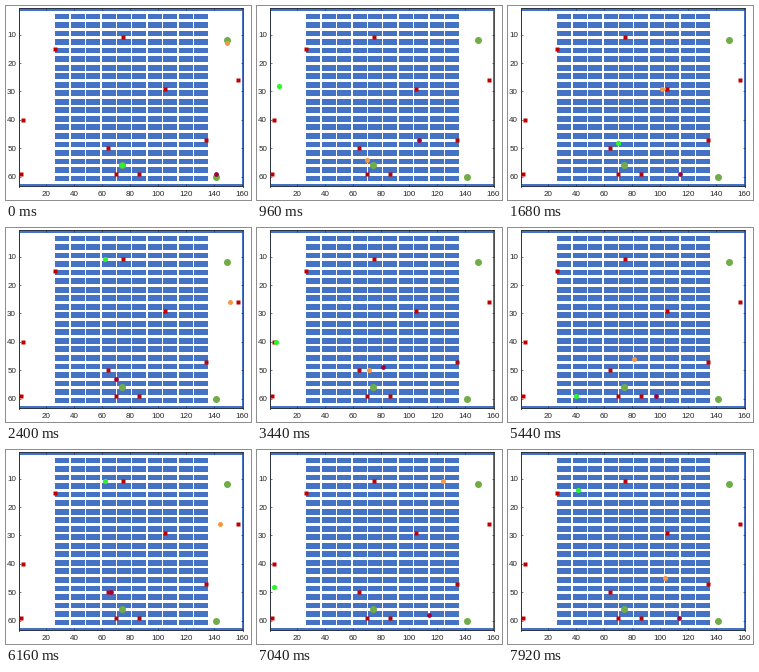
A matplotlib script for the animation above (8000 ms loop, 245 px wide and 194 px high).

```python
import numpy as np
import matplotlib.pyplot as plt
from matplotlib.animation import FuncAnimation
from matplotlib.colors import ListedColormap

W, H, DPI = 245, 194, 100
FRAMES, INTERVAL = 100, 80
COLS, ROWS = 160, 63
PX = 72 / DPI  # points per pixel

plt.rcParams["font.family"] = "Liberation Sans"

# Warehouse grid: outer wall and ten by twenty shelf blocks.
FIRST, LAST, CENTRE = 26, 136, 81
AISLES = range(FIRST, LAST + 1, 11)
grid = np.ones((ROWS, COLS))
grid[1:-1, 1:-1] = 0
for top in range(2, 60, 3):
    for left in AISLES[:-1]:
        grid[top:top + 2, left:left + 10] = 1

DEPOTS = EAST_DEPOT, HUB, SOUTH_DEPOT = (149, 12), (74, 56), (141, 60)
GOODS = (NORTHWEST, NORTH, UPPER, EAST, WEST, SOUTHWEST, MIDDLE, SOUTH,
         LOWER, CORNER) = ((26, 15), (75, 11), (105, 29), (157, 26), (3, 40),
                           (2, 59), (64, 50), (70, 59), (86, 59), (134, 47))

# Each tour passes one way point at each of these times,
# with the errands of each list in between.
KEY_FRAMES = [0, 12, 30, 43, 59, 77, 99]
GREEN = [
    HUB, [NORTHWEST], (7, 28), [WEST, SOUTHWEST, HUB, NORTHWEST],
    (62, 11), [NORTH, HUB, SOUTHWEST], (5, 40), [NORTHWEST, NORTH, HUB],
    (29, 14), [NORTHWEST, WEST, SOUTHWEST, HUB],
    (62, 11), [NORTH, HUB, WEST, SOUTHWEST, HUB], (41, 14)]
ORANGE = [
    (149, 13), [EAST], (70, 54), [HUB, MIDDLE, UPPER, EAST_DEPOT],
    (151, 26), [EAST], (71, 50), [HUB, EAST],
    (131, 47), [HUB], (144, 26), [EAST, EAST_DEPOT], (103, 45)]
CRIMSON = [
    (141, 59), [UPPER, CORNER],
    (107, 47), [MIDDLE, SOUTH, LOWER, SOUTH_DEPOT],
    (70, 53), [MIDDLE, SOUTH_DEPOT],
    (81, 49), [MIDDLE, LOWER, SOUTH_DEPOT, UPPER],
    (125, 41), [CORNER, MIDDLE, LOWER, SOUTH_DEPOT],
    (66, 50), [MIDDLE, LOWER, SOUTH_DEPOT, UPPER, CORNER], (113, 59)]


def lane(y):
    """Nearest free row between the shelves."""
    return 3 * round((y - 2) / 3) + 2


def route(a, b):
    """Corners after a on the way to b: straight outside, else by aisles."""
    (ax_, ay), (bx, by) = a, b
    if max(ax_, bx) <= FIRST or min(ax_, bx) >= LAST:
        return [b]
    aisle = bx
    if lane(ay) != lane(by):
        aisle = min(AISLES, key=lambda c: (abs(ax_ - c) + abs(bx - c),
                                           abs(c - CENTRE)))
    return [(ax_, lane(ay)), (aisle, lane(ay)), (aisle, lane(by)),
            (bx, lane(by)), b]


def trace(tour):
    """Position per frame, at constant speed between way points."""
    points, errands = tour[::2], tour[1::2]
    track = [points[0]]
    for i, stops in enumerate(errands):
        path = [points[i]]
        for stop in [*stops, points[i + 1]]:
            path += route(path[-1], stop)
        pts = np.array(path, float)
        dist = np.r_[0, np.cumsum(np.hypot(*np.diff(pts, axis=0).T))]
        steps = KEY_FRAMES[i + 1] - KEY_FRAMES[i]
        at = np.linspace(0, dist[-1], steps + 1)[1:]
        track += zip(np.interp(at, dist, pts[:, 0]),
                     np.interp(at, dist, pts[:, 1]))
    return np.round(track)


fig = plt.figure(figsize=(W / DPI, H / DPI), dpi=DPI, facecolor="white")
LEFT, TOP, WIDE, TALL = 13, 1.65, 224, 178.9
ax = fig.add_axes([LEFT / W, 1 - (TOP + TALL) / H, WIDE / W, TALL / H])
ax.imshow(grid, cmap=ListedColormap(["white", "#4472c4"]), aspect="auto",
          interpolation="nearest", extent=(0.5, COLS + 0.5, ROWS + 0.5, 0.5))
ax.spines["bottom"].set_position(("outward", -PX))
ax.set_xticks(range(20, 161, 20))
ax.set_yticks(range(10, 61, 10))
ax.tick_params(direction="in", length=2 * PX, width=0.6 * PX, pad=3 * PX,
               labelsize=8 * PX, color="#262626", labelcolor="#262626",
               top=True, right=True)
ax.tick_params(axis="x", pad=5 * PX)
for spine in ax.spines.values():
    spine.set(linewidth=0.8 * PX, color="#262626")


def dots(points, marker, size, color, z):
    x, y = zip(*points)
    return ax.plot(x, y, marker, ms=size * PX, mfc=color, mec="none",
                   clip_on=False, zorder=z)[0]


dots(DEPOTS, "o", 7, "#70ad47", 3)
dots(GOODS, "s", 4.2, "#c00000", 4)

robots = [(dots(tour[:1], "o", size, color, 5), trace(tour))
          for tour, size, color in [(CRIMSON, 4.8, "#a00040"),
                                    (ORANGE, 5, "#f79646"),
                                    (GREEN, 5.2, "#2cf52c")]]


def update(frame):
    for dot, track in robots:
        x, y = track[frame]
        dot.set_data([x], [y])
    return [dot for dot, _ in robots]


anim = FuncAnimation(fig, update, frames=FRAMES, interval=INTERVAL,
                     repeat=True, repeat_delay=0, blit=False)
plt.show()
```
